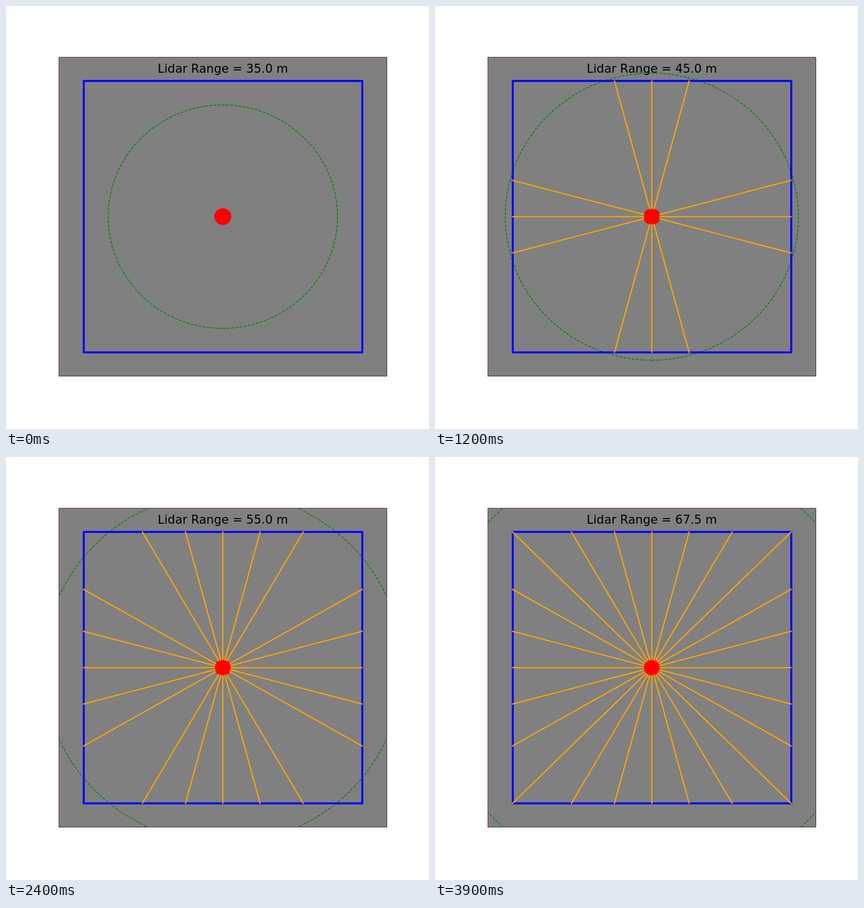
Recreate the animation shown at these times as an HTML page. Size 748 px wide and 748 px high, loop 4.2 s.

```html
<!DOCTYPE html>
<html lang="en">
<head>
<meta charset="utf-8">
<title>Lidar range</title>
<style>
  html, body { margin: 0; width: 100%; height: 100%; overflow: hidden; background: #fff; }
  svg { display: block; width: 748px; height: 748px; }
  text { font: 21px "DejaVu Sans", sans-serif; text-anchor: middle; }
</style>
</head>
<body>
<svg viewBox="0 0 748 748">
  <clipPath id="field"><rect x="93.5" y="90.5" width="580" height="564.5"/></clipPath>
  <rect x="93.5" y="90.5" width="580" height="564.5" fill="#808080"/>
  <path d="M93.5 655V90.5H673.5" fill="none" stroke="#6a2a6a"/>
  <path d="M94 654.5H673.5V91" fill="none" stroke="#333"/>
  <path id="range" clip-path="url(#field)" fill="none" stroke="#008000" stroke-width="1.39" stroke-dasharray="5.14 2.22"/>
  <ellipse cx="383.4" cy="372.5" rx="15.1" ry="14.7" fill="#f00"/>
  <rect x="137.5" y="132.5" width="492.5" height="480" fill="none" stroke="#00f" stroke-width="3.47" stroke-linejoin="round"/>
  <path id="rays" fill="none" stroke="#ffa500" stroke-width="2.08" stroke-linecap="square"/>
  <text id="label" x="383.5" y="118"></text>
</svg>
<script>
const $ = id => document.getElementById(id);
const CX = 383.4, CY = 372.5, SX = 5.797, SY = 5.645; // centre, pixels per metre
const WALL = 42.5, ROBOT = 2.5, STEP = 300, STEPS = 14, RAYS = 24;

const point = (r, a) =>
  `${(CX + r * SX * Math.cos(a)).toFixed(2)} ${(CY - r * SY * Math.sin(a)).toFixed(2)}`;

function rayPath(range) {
  let d = "";
  for (let i = 0; i < RAYS; i++) {
    const a = i * 2 * Math.PI / RAYS;
    const hit = WALL / Math.max(Math.abs(Math.cos(a)), Math.abs(Math.sin(a)));
    // the downward ray needs a range beyond the wall
    const reached = i === 18 ? range > WALL : range >= hit - 1e-9;
    if (reached) d += `M${point(ROBOT, a)}L${point(hit, a)}`;
  }
  return d;
}

// starts at the bottom and runs counter-clockwise, which sets the dash phase
function circlePath(r) {
  const arc = `A${r * SX} ${r * SY} 0 0 0 `;
  return `M${point(r, -Math.PI / 2)}${arc}${point(r, Math.PI / 2)}${arc}${point(r, -Math.PI / 2)}`;
}

let shown = -1;
function draw(now) {
  const step = Math.floor(now / STEP) % STEPS;
  if (step !== shown) {
    shown = step;
    const range = 35 + 2.5 * step;
    $("range").setAttribute("d", circlePath(range));
    $("rays").setAttribute("d", rayPath(range));
    $("label").textContent = `Lidar Range = ${range.toFixed(1)} m`;
  }
}

const start = performance.now();
function tick() {
  draw(performance.now() - start);
  requestAnimationFrame(tick);
}
tick();
</script>
</body>
</html>
```
